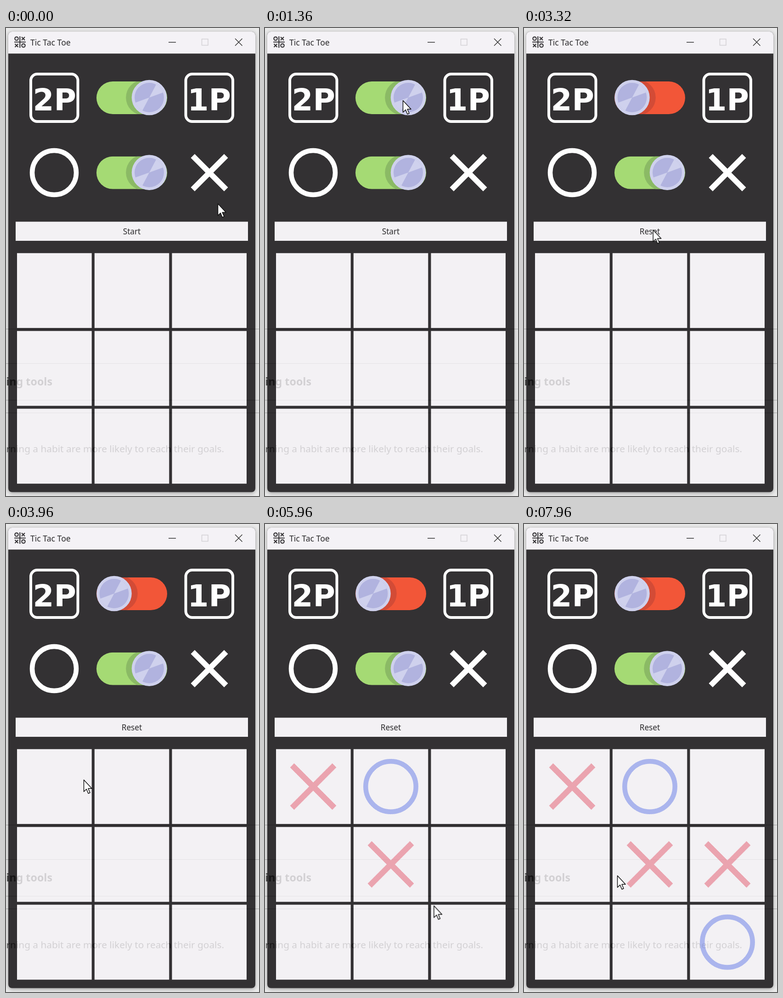
An HTML page for the animation above (8 s loop, 551x1016 px).

```html
<!DOCTYPE html>
<html lang="en">
<head>
<meta charset="utf-8">
<title>Tic Tac Toe</title>
<style>
html, body { margin: 0; width: 100%; height: 100%; overflow: hidden; background: #ebebeb; }
svg { display: block; width: 100vw; height: 100vh; }
text { font-family: "Noto Sans", "Open Sans", sans-serif; }
.ui { font-size: 17.2px; fill: #2b2a2c; }
.badge { font: bold 66px "DejaVu Sans", sans-serif; fill: #fff; }
.heading { font-size: 23.3px; font-weight: 700; }
.body { font-size: 20.8px; }
.window { filter: drop-shadow(0 2px 5px rgba(0, 0, 0, .35)); }

.step { animation: 8s step-end infinite; }
.two-off { animation-name: hide18; }
.two-on { animation-name: show18; }
.start { animation-name: hide40; }
.reset { animation-name: show40; }
.m1 { animation-name: show51; }
.m2 { animation-name: show64; }
.m3 { animation-name: show71; }
.m4 { animation-name: show79; }
.m5 { animation-name: show90; }
@keyframes hide18 { 0% { opacity: 1 } 18%, 100% { opacity: 0 } }
@keyframes show18 { 0% { opacity: 0 } 18%, 100% { opacity: 1 } }
@keyframes hide40 { 0% { opacity: 1 } 40.5%, 100% { opacity: 0 } }
@keyframes show40 { 0% { opacity: 0 } 40.5%, 100% { opacity: 1 } }
@keyframes show51 { 0% { opacity: 0 } 51%, 100% { opacity: 1 } }
@keyframes show64 { 0% { opacity: 0 } 64.5%, 100% { opacity: 1 } }
@keyframes show71 { 0% { opacity: 0 } 71%, 100% { opacity: 1 } }
@keyframes show79 { 0% { opacity: 0 } 79.5%, 100% { opacity: 1 } }
@keyframes show90 { 0% { opacity: 0 } 90%, 100% { opacity: 1 } }

.cursor { animation: roam 8s ease-in-out infinite; }
@keyframes roam {
  0%, .5% { transform: translate(461px, 381px) }
  10.5% { transform: translate(314px, 163px); animation-timing-function: ease-out }
  14%, 18% { transform: translate(300px, 157px) }
  20.5%, 33% { transform: translate(302px, 326px); animation-timing-function: ease-in }
  35.5% { transform: translate(299px, 338px); animation-timing-function: ease-out }
  39.5%, 41% { transform: translate(284px, 434px) }
  45.5% { transform: translate(154px, 582px) }
  49.5%, 52% { transform: translate(169px, 555px) }
  56% { transform: translate(244px, 742px) }
  57%, 60.5% { transform: translate(246px, 731px) }
  64%, 66.5% { transform: translate(258px, 572px) }
  70.5%, 72.5% { transform: translate(268px, 735px); animation-timing-function: ease-in }
  74.5% { transform: translate(367px, 828px); animation-timing-function: ease-out }
  77%, 81% { transform: translate(413px, 867px) }
  87.5%, 91% { transform: translate(423px, 778px) }
  93.5%, 95.5% { transform: translate(423px, 791px); animation-timing-function: ease-in }
  97.5% { transform: translate(330px, 759px); animation-timing-function: ease-out }
  99.5%, 100% { transform: translate(203px, 763px) }
}
</style>
</head>
<body>
<svg viewBox="0 0 551 1016" preserveAspectRatio="none">
  <defs>
    <pattern id="red" width="2.6" height="2.6" patternUnits="userSpaceOnUse">
      <path d="M0 0h1.3v2.6h1.3v-1.3H0z" fill="#e2566a"/>
    </pattern>
    <pattern id="blue" width="2.6" height="2.6" patternUnits="userSpaceOnUse">
      <path d="M0 0h1.3v2.6h1.3v-1.3H0z" fill="#6178e6"/>
    </pattern>
    <clipPath id="track"><rect x="197" y="116" width="154" height="71" rx="35.5"/></clipPath>
    <clipPath id="frame"><rect x="5" y="8" width="538" height="999.5" rx="8"/></clipPath>

    <g id="knob">
      <circle r="38.3" fill="#cfd1ed"/>
      <circle r="32" fill="#b1b3df"/>
      <path d="M0 0L15 -28.3A32 32 0 0 1 30.1 -10.9ZM0 0L-15 28.3A32 32 0 0 1 -30.1 10.9Z" fill="#cfd1ed"/>
    </g>
    <g id="green">
      <g clip-path="url(#track)">
        <rect x="197" y="116" width="154" height="71" fill="#a5da74"/>
        <circle cx="299.5" cy="151" r="38.3" fill="#8bba65"/>
      </g>
      <use href="#knob" x="312" y="151"/>
    </g>
    <g id="orange">
      <g clip-path="url(#track)">
        <rect x="197" y="116" width="154" height="71" fill="#f25638"/>
        <circle cx="248.5" cy="151" r="38.3" fill="#d34b36"/>
      </g>
      <use href="#knob" x="235.5" y="151"/>
    </g>

    <path id="cross" d="M-46 -46L46 46M46 -46L-46 46" fill="none" stroke="url(#red)" stroke-width="12.5"/>
    <circle id="nought" r="54.7" fill="none" stroke="url(#blue)" stroke-width="10.5"/>

    <g id="page">
      <path d="M0 653.5H551M0 728.5H551M0 808H551M0 835.5H551" stroke="#000" stroke-opacity=".45"/>
      <text class="heading" x="101" y="775.5" text-anchor="end">ing tools</text>
      <text class="body" x="475" y="920.5" text-anchor="end">rning a habit are more likely to reach their goals.</text>
    </g>
  </defs>

  <rect width="551" height="1016" fill="#ebebeb"/>
  <use href="#page" opacity=".6"/>

  <rect class="window" x="5" y="8" width="538" height="999.5" rx="8" fill="#333133"/>
  <g clip-path="url(#frame)">
    <rect x="5" y="8" width="538" height="47.5" fill="#f4f2f6"/>
    <use href="#page" opacity=".5"/>
  </g>

  <!-- title bar -->
  <g fill="none" stroke="#39373a" stroke-width="2.2">
    <path d="M30.3 18V43M18 30.5H43"/>
    <circle cx="23" cy="23" r="3.7"/>
    <circle cx="38" cy="38" r="3.7"/>
    <path d="M34 19.5l7 7m0-7l-7 7M19.5 34.5l7 7m0-7l-7 7"/>
  </g>
  <text class="ui" x="53" y="38" style="font-size:17.6px">Tic Tac Toe</text>
  <g fill="none" stroke="#333" stroke-width="1.5">
    <path d="M354 31H370"/>
    <path d="M499 23L514.500 38.500M514.500 23L499 38.500"/>
    <rect x="426.500" y="24" width="13.500" height="13.500" stroke="#d3d1d5"/>
  </g>

  <!-- options -->
  <g fill="none" stroke="#fff">
    <rect x="54" y="100" width="102.500" height="103" rx="14" stroke-width="6"/>
    <rect x="391.500" y="100" width="102.500" height="103" rx="14" stroke-width="6"/>
    <circle cx="105" cy="314" r="48" stroke-width="10.500"/>
    <path d="M406.700 277.700l72.600 72.600m0 -72.600l-72.600 72.600" stroke-width="12"/>
  </g>
  <text class="badge" x="58.500" y="179">2P</text>
  <text class="badge" x="395.500" y="179">1P</text>
  <use class="step two-off" href="#green"/>
  <use class="step two-on" href="#orange"/>
  <use href="#green" y="162.700"/>

  <rect x="21" y="420.500" width="506" height="41.500" fill="#f3f1f4"/>
  <g class="ui" text-anchor="middle">
    <text class="step start" x="274" y="447.500">Start</text>
    <text class="step reset" x="274" y="447.500">Reset</text>
  </g>

  <!-- board -->
  <path fill="none" stroke="#f3f1f4" stroke-width="162.700"
    d="M24 570H186.700M192.800 570H355.300M361.500 570H524M24 739H186.700M192.800 739H355.300M361.500 739H524M24 907.800H186.700M192.800 907.800H355.300M361.500 907.800H524"/>
  <use href="#page" opacity=".13" clip-path="url(#frame)"/>
  <g class="step m1"><use href="#cross" x="105" y="570"/></g>
  <g class="step m2"><use href="#nought" x="274" y="570"/></g>
  <g class="step m3"><use href="#cross" x="274" y="739"/></g>
  <g class="step m4"><use href="#nought" x="443" y="907.800"/></g>
  <g class="step m5"><use href="#cross" x="443" y="739"/></g>

  <path class="cursor" d="M.5 .5V26L6.200 20.500L10.200 30L14 28.300L10 19.200H18Z"
    fill="#fff" stroke="#111" stroke-width="1.500" stroke-linejoin="round"/>
</svg>
</body>
</html>
```
